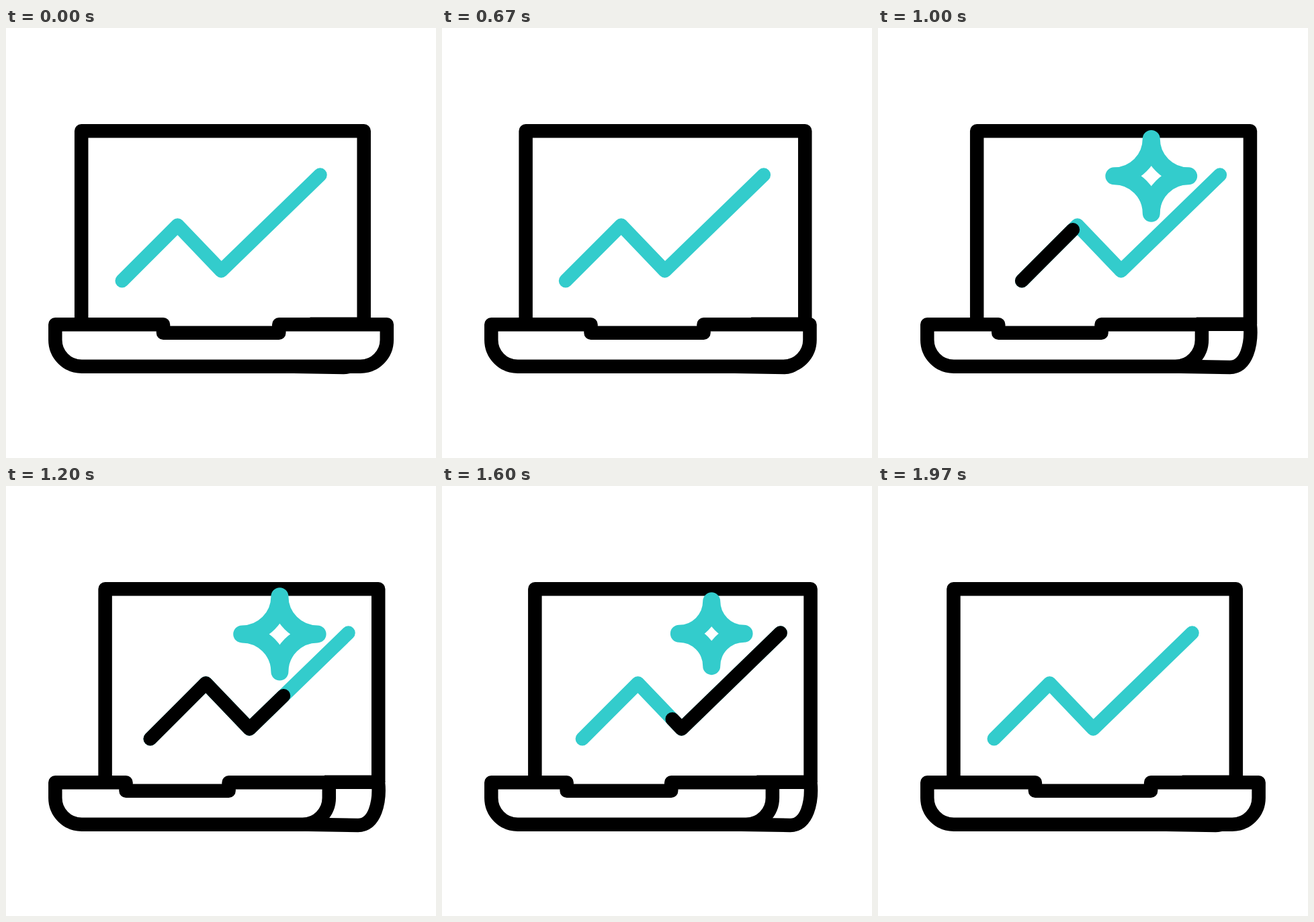
Write an HTML page that moves like this. It is 640 px wide and 640 px high and loops after 2.5 s.

```html
<!DOCTYPE html>
<html lang="en">
<head>
<meta charset="utf-8">
<title>Laptop chart</title>
<style>
  html, body { margin: 0; width: 100%; height: 100%; overflow: hidden; background: #fff; }
  svg { display: block; width: 100%; height: 100%; }
  path { fill: none; stroke: #000; stroke-width: 20.5; stroke-linejoin: round; }
  .teal { stroke: #3cc; }
  .round { stroke-linecap: round; }
  #base { fill: #fff; }
  #star { stroke-width: 26; }
</style>
</head>
<body>
<svg viewBox="0 0 640 640">
  <path id="side" d="M474 440.7H554C557 470 549 505 524 505L435 503.4"/>
  <path id="screen"/>
  <path id="base"/>
  <g id="chart">
    <path class="teal round" d="M172.7 376.2L255.4 293.5L320.4 361.4L467.5 218.6"/>
    <path id="sweep" class="round" pathLength="1" d="M172.7 376.2L255.4 293.5L320.4 361.4L467.5 218.6"/>
  </g>
  <path id="star" class="teal"/>
</svg>
<script>
const LOOP = 2500;
const $ = id => document.getElementById(id);
const [side, screen, base, chart, sweep, star] =
  ['side', 'screen', 'base', 'chart', 'sweep', 'star'].map($);

// Start and end of each eased move, in ms
const turn = {
  screen: [425, 1040, 1400, 2000],
  base: [509, 1037, 1490, 1984],
  chart: [480, 1040, 1485, 1980],
  fade: [680, 780, 1733, 1833 + 17]
};
const trimEnd = [770, 1465];
const trimStart = [1333, 1900];

function ease(t, from, to) {
  const u = Math.min(1, Math.max(0, (t - from) / (to - from)));
  return u * u * (3 - 2 * u);
}
const there = (t, [a, b, c, d]) => ease(t, a, b) - ease(t, c, d);
const mix = (a, b, p) => a + (b - a) * p;

function screenPath(p) {
  return `M${mix(112.2, 147.6, p)} 441V153.2H${mix(532.7, 554.2, p)}V441`;
}

function basePath(p) {
  const left = mix(234, 178.5, p), right = mix(406.3, 331.6, p), edge = mix(566.8, 480.8, p);
  return `M73.3 441.3H${left}V453.8H${right}V441.3H${edge}V464.2` +
    `A39.5 39.5 0 0 1 ${edge - 39.5} 503.7H112.8A39.5 39.5 0 0 1 73.3 464.2Z`;
}

// Four quarter arcs bending inwards
function starPath(p) {
  const r = 56.2 * p, x = mix(363, 407.4, p), y = mix(215.7, 220.4, p);
  const arc = (dx, dy) => `A${r} ${r} 0 0 0 ${x + dx} ${y + dy}`;
  return `M${x} ${y - r}` + arc(r, 0) + arc(0, r) + arc(-r, 0) + arc(0, -r) + 'Z';
}

function draw(t) {
  const ps = there(t, turn.screen), pc = there(t, turn.chart);
  const fade = there(t, turn.fade);
  const from = ease(t, ...trimStart), to = ease(t, ...trimEnd);

  side.setAttribute('transform', `translate(${21.5 * (ps - 1)} 0)`);
  screen.setAttribute('d', screenPath(ps));
  base.setAttribute('d', basePath(there(t, turn.base)));
  chart.setAttribute('transform', `translate(${42 * pc} 0)`);

  sweep.style.display = to - from > 0.0005 ? '' : 'none';
  sweep.setAttribute('stroke-dasharray', `${to - from} 2`);
  sweep.setAttribute('stroke-dashoffset', -from);

  star.style.display = fade > 0 ? '' : 'none';
  star.style.opacity = fade;
  star.setAttribute('d', starPath(pc));
}

const begin = performance.now();
function tick() {
  draw((performance.now() - begin) % LOOP);
  requestAnimationFrame(tick);
}
tick();
</script>
</body>
</html>
```
